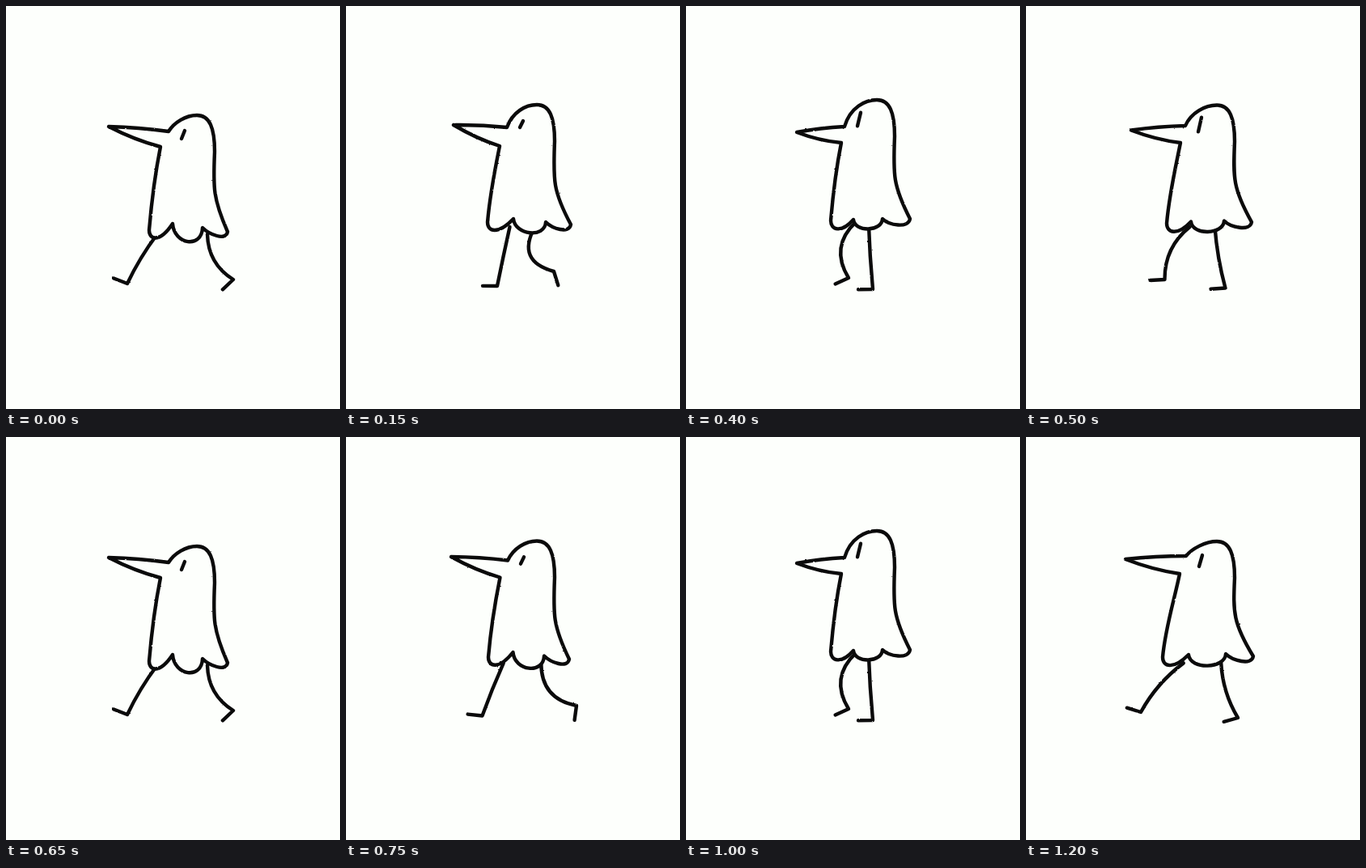
Recreate the animation shown at these times as an HTML page. Size 413 by 498 pixels, loop 1250 ms.

```html
<!DOCTYPE html>
<html lang="en">
<head>
<meta charset="utf-8">
<title>Walking bird</title>
<style>
  html, body { margin: 0; width: 100%; height: 100%; overflow: hidden; background: #fdfffc; }
  svg { display: block; width: 100vw; height: 100vh; }
  path { fill: none; stroke: #0b0b0b; stroke-width: 4.4; stroke-linecap: round; stroke-linejoin: round; }
  #body { fill: #fdfffc; }
</style>
</head>
<body>
<svg viewBox="0 0 413 498">
  <filter id="crayon" filterUnits="userSpaceOnUse" x="0" y="0" width="413" height="498" color-interpolation-filters="sRGB">
    <feTurbulence type="fractalNoise" baseFrequency="0.3" numOctaves="1" seed="4"/>
    <feDisplacementMap in="SourceGraphic" scale="2" xChannelSelector="R" yChannelSelector="G"/>
  </filter>
  <g filter="url(#crayon)">
    <path id="legs"/>
    <path id="body"/>
    <path id="eye"/>
  </g>
</svg>
<script>
const STEPS = 8;           // poses in one step
const STRIDE = 2 * STEPS;  // one leg's full cycle: planted, then swinging
const CROWN_X = 236, BACK_X = 258;

// Key poses of the body; the poses between are midpoints.
const bodyKeys = {
  0: { tip: [127, 149], brow: [201, 155], top: [135], tail: [274, 279], notchR: [243, 274], notchL: [206, 269], corner: [177, 287], throat: [191, 174] },
  2: { tip: [133, 147], brow: [199, 150], top: [122], tail: [278, 270], notchR: [247, 267], notchL: [207, 263], corner: [175, 277], throat: [190, 173] },
  3: { tip: [130, 146], brow: [197, 151], top: [122], tail: [278, 266], notchR: [244, 264], notchL: [206, 262], corner: [179, 275], throat: [190, 171] },
  5: { tip: [137, 156], brow: [196, 149], top: [116], tail: [277, 263], notchR: [243, 263], notchL: [207, 264], corner: [179, 275], throat: [192, 169] },
  7: { tip: [123, 151], brow: [198, 147], top: [129], tail: [281, 271], notchR: [247, 268], notchL: [201, 269], corner: [169, 282], throat: [190, 169] }
};

// The heel's path: it slides back on the ground, kicks up and swings forward.
const heelKeys = {
  0: [150, 343], 2: [187, 346], 3: [200, 342], 5: [231, 350], 7: [262, 347], 8: [281, 338],
  9: [285, 332], 10: [257, 328], 11: [242, 323], 13: [201, 336], 15: [142, 340]
};

const mid = (a, b) => a.map((v, i) => (v + b[i]) / 2);
const move = ([x, y], dx, dy) => [x + dx, y + dy];
const wave = (p, n) => Math.cos(2 * Math.PI * p / n);
const cubic = (...pts) => 'C' + pts.join(' ');

// Bell curve around centre c on a cycle of length n.
function bump(p, c, width, n) {
  const d = (p - c + 1.5 * n) % n - n / 2;
  return Math.exp(-((d / width) ** 2));
}

function heelAt(p) {
  return heelKeys[p] || mid(heelKeys[p - 1], heelKeys[p + 1]);
}

function bodyAt(s) {
  if (bodyKeys[s]) return bodyKeys[s];
  const a = bodyKeys[s - 1], b = bodyKeys[s + 1];
  return Object.fromEntries(Object.keys(a).map(k => [k, mid(a[k], b[k])]));
}

function leg(p) {
  const hip = [249 - 7.75 * Math.abs(p - STEPS), 273 + 9 * wave(p, STEPS)];
  const heel = heelAt(p);
  const dx = heel[0] - hip[0], dy = heel[1] - hip[1];
  const bend = 42 * bump(p, 11, 3.2, STRIDE) / Math.hypot(dx, dy);
  const knee = move(mid(hip, heel), -dy * bend, dx * bend);
  const pitch = 108 * bump(p, 10.2, 2.3, STRIDE) - 24 * bump(p, 15.6, 1.2, STRIDE);
  const angle = pitch * Math.PI / 180;
  const toe = move(heel, -18 * Math.cos(angle), 18 * Math.sin(angle));
  return `M${hip}Q${knee} ${heel}L${toe}`;
}

function body({ tip, brow, top: [top], tail, notchR, notchL, corner, throat }) {
  const [cx, cy] = corner;
  const drop = 1.45 * (cy - notchL[1]);
  const side = [BACK_X, top + 45];
  return [
    `M${tip}Q${move(mid(tip, brow), 0, -2)} ${brow}`,
    cubic([brow[0] + 7, top + 9], [CROWN_X - 14, top], [CROWN_X, top]),
    cubic([CROWN_X + 16, top], [BACK_X, top + 16], side),
    cubic([BACK_X - 2, tail[1] - 54], [BACK_X - 2, tail[1] - 41], tail),
    cubic(move(tail, -2, 12), move(notchR, 8, 8), notchR),
    cubic(move(notchR, -1, drop), move(notchL, 2, drop), notchL),
    cubic([cx + 13, cy + 6], [cx, cy + 2], [cx, cy - 10]),
    cubic([cx + 3, cy - 45], move(throat, -6, 30), throat),
    `Q${move(mid(throat, tip), 0, 4)} ${tip}Z`
  ].join('');
}

function eye({ brow, top: [top] }, s) {
  const half = 4 + 5 * bump(s, 5.7, 1.8, STEPS);
  const centre = [brow[0] + 18, top + 24];
  return `M${move(centre, 2, -half)}L${move(centre, -2, half)}`;
}

// Two steps per loop: the times at which the next pose appears.
const cuts = [50, 150, 250, 300, 400, 500, 600, 650, 750, 800, 850, 950, 1000, 1100, 1200];
const LOOP = 1250;
const set = (id, d) => document.getElementById(id).setAttribute('d', d);
let shown = -1;

function draw(ms) {
  const s = cuts.filter(c => c <= ms % LOOP).length % STEPS;
  if (s === shown) return;
  shown = s;
  const pose = bodyAt(s);
  set('legs', leg(s) + leg(s + STEPS));
  set('body', body(pose));
  set('eye', eye(pose, s));
}

const start = performance.now();
function tick() {
  draw(performance.now() - start);
  requestAnimationFrame(tick);
}
draw(0);
requestAnimationFrame(tick);
</script>
</body>
</html>
```
